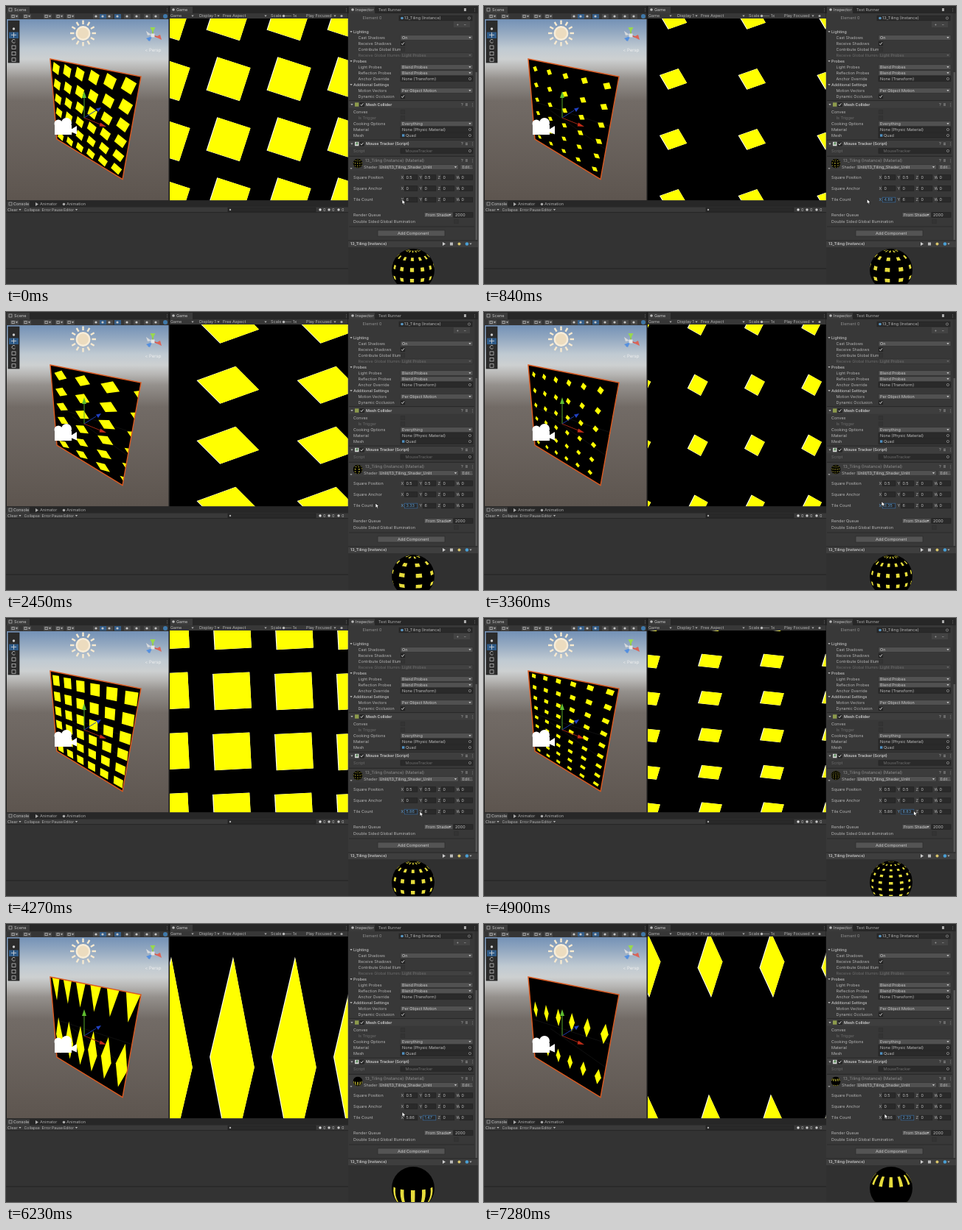
An HTML page with a canvas that plays this animation: 640 by 378 pixels, repeating every 7350 ms.

```html
<!DOCTYPE html>
<html>
<head>
<meta charset="utf-8">
<style>
html, body { margin: 0; width: 100%; height: 100%; overflow: hidden; background: #383838; }
canvas { display: block; }
</style>
</head>
<body>
<canvas id="stage" width="640" height="378"></canvas>
<script>
const g = document.getElementById('stage').getContext('2d');
const STEP = 70, STEPS = 105, TAU = Math.PI * 2;
const YELLOW = '#ffff00', INK = '#b4b4b4', DIM = '#6c6c6c';

// Keys are [step, value]; eased between neighbours.
const tileX = [[0, 6], [4, 6], [22, 2.67], [23, 2.62], [28, 2.4], [47, 6.35], [49, 6.39], [55, 5.86]];
const tileY = [[0, 6], [64, 6], [76, 13.52], [79, 13.52], [88, 1.47], [89, 1.24], [103, 2.23]];
const mouseX = [[0, 537], [4, 537], [23, 490.5], [28, 486], [48, 539], [55, 536], [61, 561], [64, 561], [76, 604], [79, 604], [89, 537], [104, 543]];
const mouseY = [[0, 263], [23, 262], [48, 257.5], [55, 259], [61, 263], [79, 261.5], [89, 255.5], [104, 258]];

function at(keys, n) {
  const i = keys.findIndex(k => k[0] > n);
  if (i < 0) return keys[keys.length - 1][1];
  if (i === 0) return keys[0][1];
  const [n0, a] = keys[i - 1], [n1, b] = keys[i];
  const p = (n - n0) / (n1 - n0);
  return a + (b - a) * p * p * (3 - 2 * p);
}

function box(x, y, w, h, fill, line) {
  g.fillStyle = fill;
  g.fillRect(x, y, w, h);
  if (line) {
    g.strokeStyle = line;
    g.lineWidth = .7;
    g.strokeRect(x, y, w, h);
  }
}

function text(s, x, y, color = INK, bold = false, size = 5.5) {
  g.font = `${bold ? 600 : 400} ${size}px Inter, sans-serif`;
  g.textRendering = 'geometricPrecision';
  g.textBaseline = 'middle';
  g.fillStyle = color;
  g.fillText(s, x, y + .3);
}

function poly(points, fill, line, width = 1) {
  g.beginPath();
  points.forEach(p => g.lineTo(p[0], p[1]));
  g.closePath();
  if (fill) { g.fillStyle = fill; g.fill(); }
  if (line) { g.strokeStyle = line; g.lineWidth = width; g.stroke(); }
}

function disc(x, y, r, fill) {
  g.beginPath();
  g.arc(x, y, r, 0, TAU);
  g.fillStyle = fill;
  g.fill();
}

function stroke(x0, y0, x1, y1, color, width = .8) {
  g.beginPath();
  g.moveTo(x0, y0);
  g.lineTo(x1, y1);
  g.strokeStyle = color;
  g.lineWidth = width;
  g.stroke();
}

function clipped(path, draw) {
  g.save();
  g.beginPath();
  path();
  g.clip();
  draw();
  g.restore();
}

const arrowDown = (x, y, c = INK) => poly([[x - 1.6, y - 1], [x + 1.6, y - 1], [x, y + 1.2]], c);
const tick = (x, y) => {
  stroke(x - 1.8, y, x - .5, y + 1.5, '#ddd', .9);
  stroke(x - .5, y + 1.5, x + 2, y - 1.7, '#ddd', .9);
};

function dropdown(s, x, y, w, color = '#c8c8c8') {
  box(x, y - 3.3, w, 6.6, color === DIM ? '#414141' : '#515151', '#303030');
  text(s, x + 2, y, color);
  arrowDown(x + w - 4, y, color);
}

function field(s, x, y, w, { color = '#bcbcbc', focus = false, picker = false } = {}) {
  box(x, y - 3.3, w, 6.6, '#2a2a2a', focus ? '#35689c' : '#222');
  text(s, x + 2, y, focus ? '#5f9fd6' : color);
  if (picker) {
    g.beginPath();
    g.arc(x + w - 4, y, 1.6, 0, TAU);
    g.strokeStyle = '#999';
    g.lineWidth = .7;
    g.stroke();
  }
}

function checkbox(x, y, on, dim) {
  box(x - 2.7, y - 2.7, 5.4, 5.4, dim ? '#343434' : '#2a2a2a', dim ? '#303030' : '#202020');
  if (on) tick(x, y);
}

function headerIcons(y) {
  text('?', 617, y, '#aaa');
  stroke(623, y - 1, 626, y - 1, '#aaa');
  stroke(623, y + 1, 626, y + 1, '#aaa');
  text('⋮', 630, y, '#bbb');
}

// Unit square (top left origin) to any four-cornered shape.
function projection([a, b, c, d]) {
  const x1 = b[0] - c[0], y1 = b[1] - c[1], x2 = d[0] - c[0], y2 = d[1] - c[1];
  const sx = a[0] - b[0] + c[0] - d[0], sy = a[1] - b[1] + c[1] - d[1];
  const det = x1 * y2 - x2 * y1;
  const p = (sx * y2 - x2 * sy) / det, q = (x1 * sy - sx * y1) / det;
  return (u, v) => {
    const w = 1 - v, k = p * u + q * w + 1;
    return [0, 1].map(i =>
      ((b[i] - a[i] + p * b[i]) * u + (d[i] - a[i] + q * d[i]) * w + a[i]) / k);
  };
}

const quad = [[60, 72], [183, 96], [158, 235.5], [69, 181]];
const onQuad = projection(quad);
const onGame = (u, v) => [342.5 + 492 * (u - .5), 140.3 - 492 * (v - .5)];

function onBall(cx, cy, r) {
  const tilt = .26;
  return (u, v) => {
    const lat = (Math.min(1, Math.max(0, v)) - .5) * Math.PI, lon = (u - .6) * Math.PI;
    const y = Math.sin(lat), z = Math.cos(lat) * Math.cos(lon);
    return [
      cx + r * Math.cos(lat) * Math.sin(lon),
      cy - r * (y * Math.cos(tilt) - z * Math.sin(tilt)),
      y * Math.sin(tilt) + z * Math.cos(tilt)
    ];
  };
}

// Rotation and pulsing size of the square inside each tile.
const pose = theta => ({
  angle: -theta,
  radius: .15 * Math.SQRT2 / ((Math.sin(theta) + 1) / 3 + .5)
});

const flat = points => poly(points, YELLOW);

// Yellow with a thin pale rim on the left.
function rimmed(points) {
  poly(points, '#fffff0');
  clipped(() => points.forEach(p => g.lineTo(...p)),
    () => poly(points.map(([x, y]) => [x + 1.2, y]), YELLOW));
}

function tiles(map, [tx, ty], { angle, radius }, { from = 0, to = 1, cuts = 1, paint = flat } = {}) {
  for (let i = Math.floor(from * tx); i < to * tx; i++) {
    for (let j = 0; j < ty; j++) {
      const centre = map((i + .5) / tx, (j + .5) / ty);
      if (centre[2] < 0) continue;
      const points = [];
      for (let k = 0; k < 4 * cuts; k++) {
        const c = Math.floor(k / cuts), f = k % cuts / cuts;
        const a = angle + (c + .5) * TAU / 4, b = a + TAU / 4;
        const x = Math.cos(a) * (1 - f) + Math.cos(b) * f;
        const y = Math.sin(a) * (1 - f) + Math.sin(b) * f;
        points.push(map((i + .5 + radius * x) / tx, (j + .5 + radius * y) / ty));
      }
      paint(points);
    }
  }
}

// Material preview: follows the tile count but stays at rest.
function ball(x, y, r, count) {
  clipped(() => g.arc(x, y, r, 0, TAU), () => {
    box(x - r, y - r, 2 * r, 2 * r, '#000');
    tiles(onBall(x, y, r), count, pose(0),
      { from: .05, to: 1.15, cuts: 5, paint: p => poly(p, '#e6dc3c') });
  });
}

function scene(s) {
  const sky = g.createLinearGradient(0, 18, 0, 265);
  [[0, '#7391b6'], [.08, '#97abc2'], [.16, '#c0cad2'], [.22, '#cdd0d1'], [.27, '#b7b6b4'],
   [.33, '#94908c'], [.45, '#726b66'], [1, '#5d554f']].forEach(c => sky.addColorStop(...c));
  box(1, 18, 219.5, 246.5, sky);

  poly(quad, '#000');
  clipped(() => quad.forEach(p => g.lineTo(...p)), () => tiles(onQuad, s.shownCount, s.pose));
  stroke(68, 130, 172, 164, 'rgba(150,150,150,.2)', .5);
  stroke(90, 142, 165, 195, 'rgba(150,150,150,.2)', .5);
  poly(quad, null, '#dc5a20', 1.4);

  // Move handles
  stroke(106, 152, 106, 124, '#55a52a', 1);
  poly([[103, 125], [109, 125], [106, 116]], '#5fbd30');
  stroke(106, 152, 122, 142, '#1c3aa8', 1);
  poly([[122, 139.5], [125, 144], [129, 138]], '#2142c4');
  stroke(106, 152, 128, 161, '#9c2414', 1);
  poly([[128, 158.5], [126.5, 163.5], [136, 164]], '#c42c17');

  // Camera
  disc(71, 160, 5.5, '#fff');
  disc(82, 159, 7, '#fff');
  box(66, 162, 23, 13, '#fff');
  poly([[88, 168], [96, 163], [96, 174.5], [88, 171]], '#fff');

  // Light
  for (let i = 0; i < 12; i++) {
    const a = i * TAU / 12, c = Math.cos(a), d = Math.sin(a);
    stroke(104.5 + 12 * c, 37 + 12 * d, 104.5 + 17.5 * c, 37 + 17.5 * d, '#f7ead0', 2.4);
  }
  disc(104.5, 37, 10, '#f8edd8');
  disc(104.5, 37, 7.6, '#ecdcbf');

  // Orientation
  stroke(199, 40, 199, 31, '#8cc63e', 1.6);
  stroke(199, 40, 208, 43, '#d25348', 1.6);
  stroke(199, 40, 193, 47, '#4b83d0', 1.6);
  poly([[195.5, 29], [202.5, 29], [199, 36]], '#98d94d');
  poly([[209, 39], [211, 46], [203, 42]], '#dc6457');
  poly([[190, 44], [195, 48], [198, 41]], '#5590df');
  poly([[190, 34], [192, 40], [197, 39]], '#d6d9dc');
  box(196.5, 37.5, 5, 5, '#e4e4e4');
  text('<', 188.5, 60, '#eee');
  text('Persp', 194, 60, '#f0f0f0', false, 6);

  // Tool strip
  box(3, 20, 15, 57, '#2b2b2b', '#202020');
  box(4, 35.5, 13, 8.5, '#2f5b88');
  for (let i = 0; i < 6; i++) {
    const y = 31 + i * 8.4;
    if (i === 0) disc(10.5, y, 1.7, '#ccc');
    else if (i === 1) {
      stroke(7, y, 14, y, '#ddd');
      stroke(10.5, y - 3.5, 10.5, y + 3.5, '#ddd');
    } else if (i === 2) {
      g.beginPath();
      g.arc(10.5, y, 2.4, .5, 5.6);
      g.strokeStyle = '#ccc';
      g.stroke();
    } else box(8, y - 2.3, 5, 4.6, '#2b2b2b', '#ccc');
  }
}

function tabBar(x, y, w, label, labelX, tabW) {
  box(x, y, w, 10, '#272727');
  box(x + 1, y + 1, tabW, 9, '#3b3b3b');
  text(label, labelX, y + 5, '#cacaca');
}

function leftChrome() {
  tabBar(0, 0, 220.5, 'Scene', 11, 31);
  box(4, 3, 4, 4, '#3b3b3b', '#bbb');
  box(0, 10, 220.5, 8, '#353535');
  [10, 27, 55, 71, 86].forEach(x => {
    box(x - 4, 11, 11, 6.3, '#4a4a4a');
    box(x - 2, 12.5, 3.2, 3.2, '#4a4a4a', '#c0c0c0');
    arrowDown(x + 4.5, 14);
  });
  [122, 131, 140, 151, 164, 177, 191, 203].forEach((x, i) => {
    box(x - 4, 11, 9, 6.3, i === 1 || i === 3 ? '#345d88' : '#484848');
    disc(x, 14, 1.6, '#c5c5c5');
  });
  disc(216, 14, 3, '#3f78a9');
  text('⋮', 216, 5);

  tabBar(222, 0, 241.5, 'Game', 231, 30);
  disc(227, 5, 1.8, '#bbb');
  box(222, 10, 241.5, 7, '#373737');
  text('Game', 223, 13.5);
  arrowDown(253, 13.5);
  text('Display 1', 262, 13.5);
  arrowDown(288, 13.5);
  text('Free Aspect', 294, 13.5);
  arrowDown(352, 13.5);
  text('Scale', 359, 13.5);
  stroke(376, 13.5, 387, 13.5, '#777');
  disc(376.5, 13.5, 1.7, '#bbb');
  text('1x', 389, 13.5);
  text('Play Focused', 407, 13.5);
  arrowDown(446, 13.5);
  disc(455, 13.5, 1.6, '#aaa');
  text('⋮', 459, 5);

  box(0, 264.5, 464, 114, '#333');
  tabBar(0, 264.5, 464, 'Console', 10, 31);
  box(4, 267, 4, 4, '#3b3b3b', '#aaa');
  text('Animator', 46, 269.5, '#aaa');
  poly([[40, 267], [44, 269.5], [40, 272]], '#aaa');
  text('Animation', 82, 269.5, '#aaa');
  disc(78.5, 269.5, 1.8, '#aaa');
  box(0, 273.5, 464, 7, '#393939');
  text('Clear', 2, 277);
  arrowDown(19, 277);
  text('Collapse', 24.5, 277, INK, false, 5.2);
  text('Error Pause', 48.5, 277, INK, false, 5.2);
  text('Editor', 78, 277, INK, false, 5.2);
  arrowDown(95.5, 277);
  box(301, 274.3, 119, 5.6, '#292929', '#212121');
  disc(304, 277, 1.2, '#aaa');
  [[426, '#ddd'], [438, '#c8c8c8'], [451, '#c8c8c8']].forEach(([x, c]) => {
    disc(x, 277, 1.7, c);
    text('0', x + 4, 277);
  });
  stroke(0, 280.7, 464, 280.7, '#222');
  stroke(0, 357, 464, 357, '#222', 1);
}

function vector(label, y, values, focus) {
  text(label, 471, y);
  values.forEach((v, i) => {
    const x = 535.5 + i * 25;
    text('XYZW'[i], x, y, i === focus ? '#5f9fd6' : INK);
    field(v, x + 5, y, 17.3, { focus: i === focus });
  });
}

function section(label, y, icon) {
  box(465, y - 5, 170, 9.5, '#3e3e3e');
  stroke(465, y - 5.3, 635, y - 5.3, '#222');
  arrowDown(469, y);
  box(473, y - 2.7, 5.4, 5.4, icon);
  checkbox(482.5, y, true);
  text(label, 488, y, '#d0d0d0', true, 5.3);
  headerIcons(y);
}

function inspector(s) {
  box(464, 0, 176, 378, '#383838');
  tabBar(464, 0, 176, 'Inspector', 474, 35);
  disc(470, 5, 1.8, '#bbb');
  text('Test Runner', 505, 5, '#aaa');
  box(621, 3, 3, 4, '#aaa');
  text('⋮', 633, 5);
  text('Element 0', 483.5, 16.5, '#8e8e8e');
  field('', 533, 16.5, 99, { picker: true });
  disc(537, 16.5, 1.8, '#5b9ac8');
  text('13_Tiling (Instance)', 540, 16.5);
  box(607, 21, 22, 8, '#434343');
  text('+', 610.5, 25);
  text('−', 620.5, 25);

  ['Lighting', 'Cast Shadows', 'Receive Shadows', 'Contribute Global Illumination',
   'Receive Global Illumination', 'Probes', 'Light Probes', 'Reflection Probes', 'Anchor Override',
   'Additional Settings', 'Motion Vectors', 'Dynamic Occlusion'].forEach((label, i) => {
    const y = 35 + 8 * i, bold = [0, 5, 9].includes(i);
    if (bold) arrowDown(468, y);
    clipped(() => g.rect(465, y - 4, 70, 8), () =>
      text(label, bold ? 471 : 477.5, y, i === 4 ? DIM : INK, bold, bold ? 5.3 : 5.4));
  });
  dropdown('On', 535, 43, 98);
  checkbox(538, 51, true);
  checkbox(538, 59, false, true);
  dropdown('Light Probes', 535, 67, 98, DIM);
  dropdown('Blend Probes', 535, 83, 98);
  dropdown('Blend Probes', 535, 91, 98);
  field('None (Transform)', 535, 99, 98, { picker: true });
  dropdown('Per Object Motion', 535, 115, 98);
  checkbox(538, 123, true);

  section('Mesh Collider', 134, '#8d9b4c');
  ['Convex', 'Is Trigger', 'Cooking Options', 'Material', 'Mesh'].forEach((label, i) =>
    text(label, i === 1 ? 477.5 : 471, 144 + 8 * i, i === 1 ? DIM : INK));
  checkbox(538, 144, false, true);
  checkbox(538, 152, false, true);
  dropdown('Everything', 535, 160, 98);
  field('None (Physic Material)', 535, 168, 98, { picker: true });
  field('', 535, 176, 98, { picker: true });
  box(537, 174.3, 3.4, 3.4, '#4f8fc0');
  text('Quad', 542, 176);

  section('Mouse Tracker (Script)', 187.5, '#d6d6d6');
  text('#', 474, 187.5, '#3a7a3a', true);
  text('Script', 471, 197, DIM);
  field('', 535, 197, 98, { color: DIM, picker: true });
  text('MouseTracker', 541.5, 197, DIM);

  box(465, 204.5, 170, 19, '#3c3c3c');
  stroke(465, 204.3, 635, 204.3, '#222');
  ball(477, 214, 6.5, s.count);
  arrowDown(468, 221, '#999');
  text('13_Tiling (Instance) (Material)', 487, 210, '#8e8e8e', false, 5.8);
  headerIcons(210);
  text('Shader', 485, 219);
  dropdown('Unlit/13_Tiling_Shader_Unlit', 504.5, 219, 109);
  box(616, 215.7, 17, 6.6, '#515151', '#303030');
  text('Edit...', 618.5, 219);

  const [x, y] = s.shownCount.map(v => String(+v.toFixed(2)));
  vector('Square Position', 233, ['0.5', '0.5', '0', '0']);
  vector('Square Anchor', 248, ['0', '0', '0', '0']);
  vector('Tile Count', 263.5, [x, y, '0', '0'], s.focus);

  text('Render Queue', 471, 284);
  dropdown('From Shader', 567, 284, 39);
  field('2000', 607, 284, 26);
  text('Double Sided Global Illumination', 471, 293);
  checkbox(610.5, 293, false, true);
  stroke(465, 300, 635, 300, '#262626');
  box(504, 305, 91, 8, '#545454', '#2c2c2c');
  text('Add Component', 531, 309, '#ccc');

  box(464, 319, 176, 9, '#3e3e3e');
  stroke(464, 319, 640, 319, '#222');
  text('13_Tiling (Instance)', 467, 323.5, '#c8c8c8', true, 5.3);
  poly([[592, 321], [596, 323.5], [592, 326]], '#ccc');
  box(602, 321.5, 4, 4, '#bbb');
  disc(614.5, 323.5, 2, '#d8c46a');
  disc(625, 323.5, 2.3, '#4a9fd4');
  arrowDown(630, 323.5);
  box(464, 328, 176, 50, '#303030');
  ball(552, 359, 29, s.count);
  box(635.5, 10, 4.5, 309, '#333');
  box(636.5, 90, 2.5, 228, '#575757');
}

function pointer(x, y) {
  const shape = [[0, 0], [0, 6.5], [1.6, 5.2], [2.7, 7.5], [3.9, 7], [2.9, 4.7], [5, 4.6]];
  poly(shape.map(p => [x + p[0], y + p[1]]), '#fff', '#111', .7);
}

function draw(n) {
  const count = k => [at(tileX, k), at(tileY, k)];
  const s = {
    count: count(n),
    shownCount: count(Math.max(0, n - 1)), // editor views trail the game by one step
    pose: pose(-1.257 + .2 * n),
    focus: n < 4 ? -1 : n < 64 ? 0 : 1
  };
  box(0, 0, 640, 378, '#1b1b1b');
  scene(s);
  clipped(() => g.rect(222, 17, 241.5, 247.5), () => {
    box(222, 17, 242, 248, '#000');
    tiles(onGame, s.count, s.pose, { paint: rimmed });
  });
  leftChrome();
  inspector(s);
  pointer(at(mouseX, n), at(mouseY, n));
}

const start = performance.now();
let shown = -1;
function frame() {
  const n = Math.floor((performance.now() - start) / STEP) % STEPS;
  if (n !== shown) draw(shown = n);
  requestAnimationFrame(frame);
}
frame();
</script>
</body>
</html>
```
